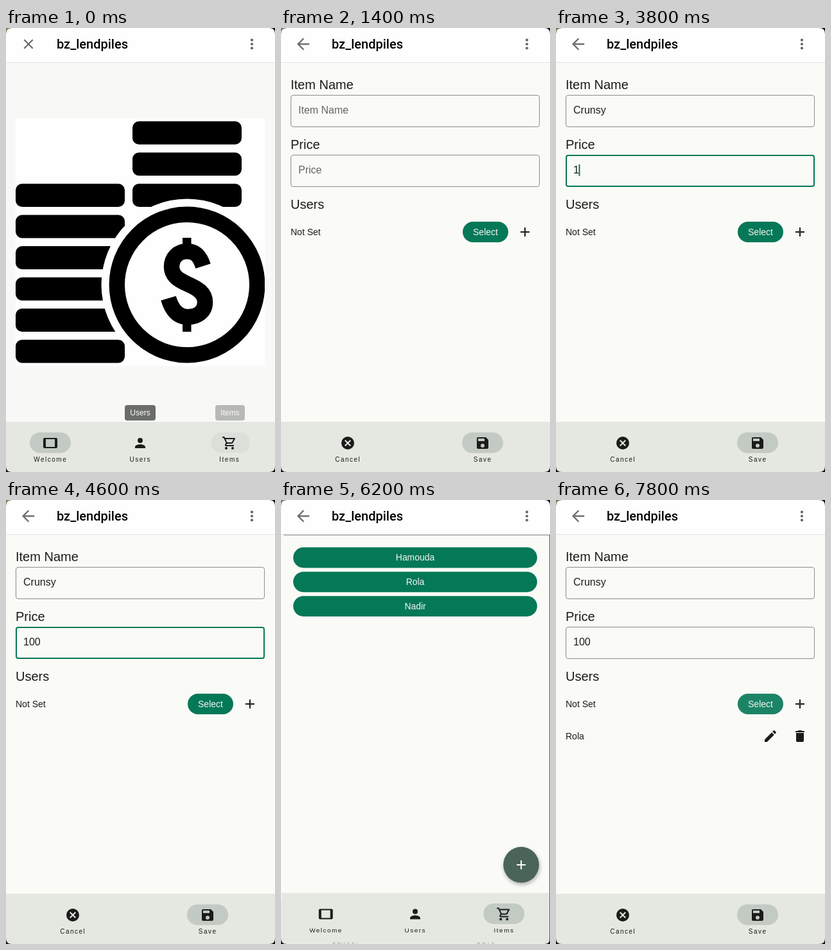
An HTML page for the animation above (8000 ms loop, 419 by 690 pixels).

```html
<!DOCTYPE html>
<html lang="en">
<head>
<meta charset="utf-8">
<style>
  html, body { margin: 0; width: 100%; height: 100%; overflow: hidden; background: #000; }
  #stage { display: block; width: 419px; height: 690px; font-family: "Liberation Sans", Arial, sans-serif; }
  .title { font: 500 20px Roboto, sans-serif; }
</style>
</head>
<body>
<svg id="stage" viewBox="0 0 419 690"></svg>
<script>
const LOOP = 8000;
const stage = document.getElementById('stage');
const INK = '#1b1c1a', GREEN = '#057857', PAGE = '#fafaf6';
const APP = 'bz_lendpiles', ITEM = 'Crunsy', PEOPLE = ['Hamouda', 'Rola', 'Nadir'];
const PICKED = PEOPLE[1];

const ICONS = {
  close: 'M19 6.4L17.6 5 12 10.6 6.4 5 5 6.4 10.6 12 5 17.6 6.4 19 12 13.4 17.6 19 19 17.6 13.4 12z',
  back: 'M20 11H7.83l5.59-5.59L12 4l-8 8 8 8 1.41-1.41L7.83 13H20z',
  tablet: 'M21 4H3c-1.1 0-2 .9-2 2v12c0 1.1.9 2 2 2h18c1.1 0 2-.9 2-2V6c0-1.1-.9-2-2-2zm-2 14H5V6h14z',
  person: 'M12 12a4 4 0 1 0 0-8 4 4 0 0 0 0 8zm0 2c-2.67 0-8 1.34-8 4v2h16v-2c0-2.66-5.33-4-8-4z',
  cart: 'M15.55 13c.75 0 1.41-.41 1.75-1.03l3.58-6.49c.37-.66-.11-1.48-.87-1.48H5.21l-.94-2H1v2h2l3.6 7.59-1.35 2.44C4.52 15.37 5.48 17 7 17h12v-2H7l1.1-2zM6.16 6h12.15l-2.76 5H8.53zM7 18a2 2 0 1 0 0 4 2 2 0 0 0 0-4zm10 0a2 2 0 1 0 0 4 2 2 0 0 0 0-4z',
  cancel: 'M12 2a10 10 0 1 0 0 20 10 10 0 0 0 0-20zm5 13.6L15.6 17 12 13.4 8.4 17 7 15.6 10.6 12 7 8.4 8.4 7 12 10.6 15.6 7 17 8.4 13.4 12z',
  save: 'M17 3H5c-1.1 0-2 .9-2 2v14c0 1.1.9 2 2 2h14c1.1 0 2-.9 2-2V7zm-5 16a3 3 0 1 1 0-6 3 3 0 0 1 0 6zm3-10H5V5h10z',
  add: 'M19 13h-6v6h-2v-6H5v-2h6V5h2v6h6z',
  edit: 'M3 17.25V21h3.75L17.81 9.94l-3.75-3.75zM20.71 7.04c.39-.39.39-1.02 0-1.41l-2.34-2.34c-.39-.39-1.02-.39-1.41 0l-1.83 1.83 3.75 3.75z',
  trash: 'M6 19c0 1.1.9 2 2 2h8c1.1 0 2-.9 2-2V7H6zM19 4h-3.5l-1-1h-5l-1 1H5v2h14z'
};

const clamp = v => Math.min(1, Math.max(0, v));
const ramp = (t, from, to) => clamp((t - from) / (to - from));
const easeOut = u => 1 - (1 - u) ** 3;
const within = (t, from, to) => t >= from && t < to;

const pen = document.createElement('canvas').getContext('2d');
const textWidth = s => {
  pen.font = '16px "Liberation Sans", Arial, sans-serif';
  return pen.measureText(s).width;
};

const rect = (x, y, w, h, fill, r = 0, extra = '') =>
  `<rect x="${x}" y="${y}" width="${w}" height="${h}" rx="${r}" fill="${fill}" ${extra}/>`;
const circle = (x, y, r, fill, extra = '') => `<circle cx="${x}" cy="${y}" r="${r}" fill="${fill}" ${extra}/>`;
const text = (x, y, size, s, fill = INK, extra = '') =>
  `<text x="${x}" y="${y}" font-size="${size}" fill="${fill}" ${extra}>${s}</text>`;
const centered = (x, y, size, s, fill) => text(x, y, size, s, fill, 'text-anchor="middle"');
const icon = (name, x, y, fill = INK, size = 1) =>
  `<path transform="translate(${x} ${y}) scale(${size}) translate(-12 -12)" fill="${fill}" fill-rule="evenodd" d="${ICONS[name]}"/>`;
const backdrop = fill => rect(0, 53, 419, 637, fill);

function navBar(items, active, hovered) {
  return rect(0, 612, 419, 78, '#e5e8e1') + items.map(([name, label, x], i) =>
    (i === active ? rect(x - 32, 628.5, 64, 32, '#c3c9c3', 16) : '') +
    (i === hovered ? rect(x - 28.5, 628.5, 60, 32, '#dcdfd9', 15) : '') +
    icon(name, x, 645) +
    text(x + .25, 674, 10, label, INK, 'text-anchor="middle" letter-spacing="1.5"')).join('');
}
const mainNav = (active, hovered) => navBar(
  [['tablet', 'Welcome', 69], ['person', 'Users', 209], ['cart', 'Items', 348]], active, hovered);

function coins() {
  const bar = (x, row) => rect(x, 145 + row * 48.5, 170, 36, '#000', 10);
  return '<svg x="15" y="140" width="388" height="385" viewBox="15 140 388 385">' +
    rect(15, 140, 388, 385, '#fefefe') +
    [0, 1, 2].map(r => bar(197, r)).join('') +
    [2, 3, 4, 5, 6, 7].map(r => bar(15, r)).join('') +
    circle(282, 399, 133.5, '#fefefe') +
    circle(282, 399, 109.2, '#fefefe', 'stroke="#000" stroke-width="24.4"') +
    `<path d="M307 370C302 354 295 347 282 347C267 347 258 358 258 371C258 386 270 392 283 398
      C299 405 310 412 310 426C310 441 298 449 283 449C267 449 258 437 253 420"
      fill="none" stroke="#000" stroke-width="24.5"/>` +
    rect(275, 326, 13.5, 18, '#000') + rect(275, 454, 13.5, 18, '#000') + '</svg>';
}

const welcomePage = () => backdrop('#f8f9f7') + coins() + mainNav(0, 2);

function listPage(names, hovered) {
  const rows = names.map((name, i) => {
    const y = 72 + 38 * i;
    return rect(18, y, 382, 32, i === hovered ? '#158160' : GREEN, 16) + centered(209, y + 21, 14, name, '#f4f8f4');
  }).join('');
  const fab = circle(376, 571, 28, '#000', 'opacity=".3" filter="url(#soft)"') +
    circle(375, 568, 28, '#4b6458') + icon('add', 375, 568, '#fff');
  return backdrop(PAGE) + rows + fab + mainNav(2);
}

function field(y, label, value, focused, caret) {
  const box = focused
    ? rect(16, y + 1, 386, 48, 'none', 3, `stroke="${GREEN}" stroke-width="2"`)
    : rect(15.5, y + .5, 387, 49, 'none', 3.5, 'stroke="#8b8e89"');
  return text(15, y - 9, 20, label) + box +
    text(27, y + 29, 16, value || label, value ? INK : '#656865') +
    (focused && caret ? rect(26.5 + textWidth(value), y + 15, 2, 18, GREEN) : '');
}

function formPage(t) {
  const name = ITEM.slice(0, Math.max(0, Math.floor((t - 1800) / 200)));
  const price = '100'.slice(0, Math.max(0, Math.floor((t - 3600) / 200)));
  const blink = Math.floor((t - 3800) / 500) % 2 === 0;
  const added = t >= 7500;
  const glow = within(t, 5600, 6400) ? .18 : within(t, 4700, 5600) || t >= 7700 ? .09 : 0;
  return backdrop(PAGE) +
    field(104, 'Item Name', name, within(t, 1700, 3500), t < 3100) +
    field(197, 'Price', price, within(t, 3500, 6500), t < 3800 || blink) +
    text(15, 281, 20, 'Users') +
    text(15, 322, 14, within(t, 6600, 7500) ? PICKED : 'Not Set') +
    rect(283, 301, 71, 32, GREEN, 16) + rect(283, 301, 71, 32, '#fff', 16, `opacity="${glow}"`) +
    centered(318.5, 322, 14, 'Select', '#f4f8f4') +
    (within(t, 7300, 7650) ? circle(380, 317, 20, INK, 'opacity=".08"') : '') +
    icon('add', 380, 317) +
    (added ? text(15, 372, 14, PICKED) + icon('edit', 334, 367) + icon('trash', 380, 367) : '') +
    navBar([['cancel', 'Cancel', 104], ['save', 'Save', 314]], 1);
}

const layer = (content, scale, opacity = 1, [x, y] = [209.5, 372]) =>
  `<g opacity="${opacity}" transform="translate(${x} ${y}) scale(${scale}) translate(${-x} ${-y})">${content}</g>`;

// Zoom transitions: the upper page grows in over a scrim, or shrinks and fades away.
function push(below, above, u) {
  const p = easeOut(u);
  return layer(below, 1 + .05 * p) +
    rect(4, 54, 415, 632, '#000', 0, `opacity="${.6 * p}"`) +
    layer(above, .85 + .15 * p, ramp(u, .125, .25));
}
function pop(below, above, u) {
  const p = easeOut(u);
  return layer(below, 1.104 - .104 * p, 1, [222, 403]) +
    layer(above, 1 - .088 * p, 1 - ramp(u, .0825, .2075));
}

function pages(t) {
  const people = listPage(PEOPLE, t >= 6450 ? 1 : -1);
  if (t < 400) return welcomePage();
  if (t < 1000) return listPage([]);
  if (t < 1300) return push(listPage([]), formPage(t), (t - 1000) / 300);
  if (t < 6000) return formPage(t);
  if (t < 6300) return push(formPage(t), people, (t - 6000) / 300);
  if (t < 6758) return people;
  if (t < 7058) return pop(formPage(t), people, (t - 6758) / 300);
  return formPage(t);
}

function tooltip(x, w, label, opacity) {
  return opacity > 0 ? `<g opacity="${opacity}">` + rect(x, 586, w, 24, '#6b6d6a', 4) +
    centered(x + w / 2, 602, 12, label, '#fff') + '</g>' : '';
}

function header(t) {
  return rect(0, 0, 419, 53, '#fefefe') + rect(0, 53, 419, 1, '#e1e3df') +
    (t < 1000 ? icon('close', 35, 25, '#666', 1.06) : icon('back', 34.5, 25, '#707070', 1.2)) +
    `<text class="title" x="79" y="32">${APP}</text>` +
    [18.7, 25, 31.3].map(y => circle(383, y, 2.1, '#666')).join('');
}

const corners = '<path fill-rule="evenodd" fill="#111" d="M0 0H419V690H0ZM9 0H410Q419 0 419 9V681Q419 690 410 690H9Q0 690 0 681V9Q0 0 9 0Z"/>' +
  '<path fill="#7d845f" d="M0 0H9Q0 0 0 9Z"/>';
const defs = '<defs><filter id="soft" x="-30%" y="-30%" width="160%" height="160%"><feGaussianBlur stdDeviation="3"/></filter></defs>';

const scene = t => defs + pages(t) +
  tooltip(185, 48, 'Users', 1 - ramp(t, 50, 200)) +
  tooltip(326, 46, 'Items', t < 400 ? .45 + .55 * ramp(t, 0, 150) : 1 - ramp(t, 400, 600)) +
  header(t) + corners;

const start = performance.now();
let shown = '';
function tick() {
  const next = scene((performance.now() - start) % LOOP);
  if (next !== shown) stage.innerHTML = shown = next;
  requestAnimationFrame(tick);
}
tick();
</script>
</body>
</html>
```
